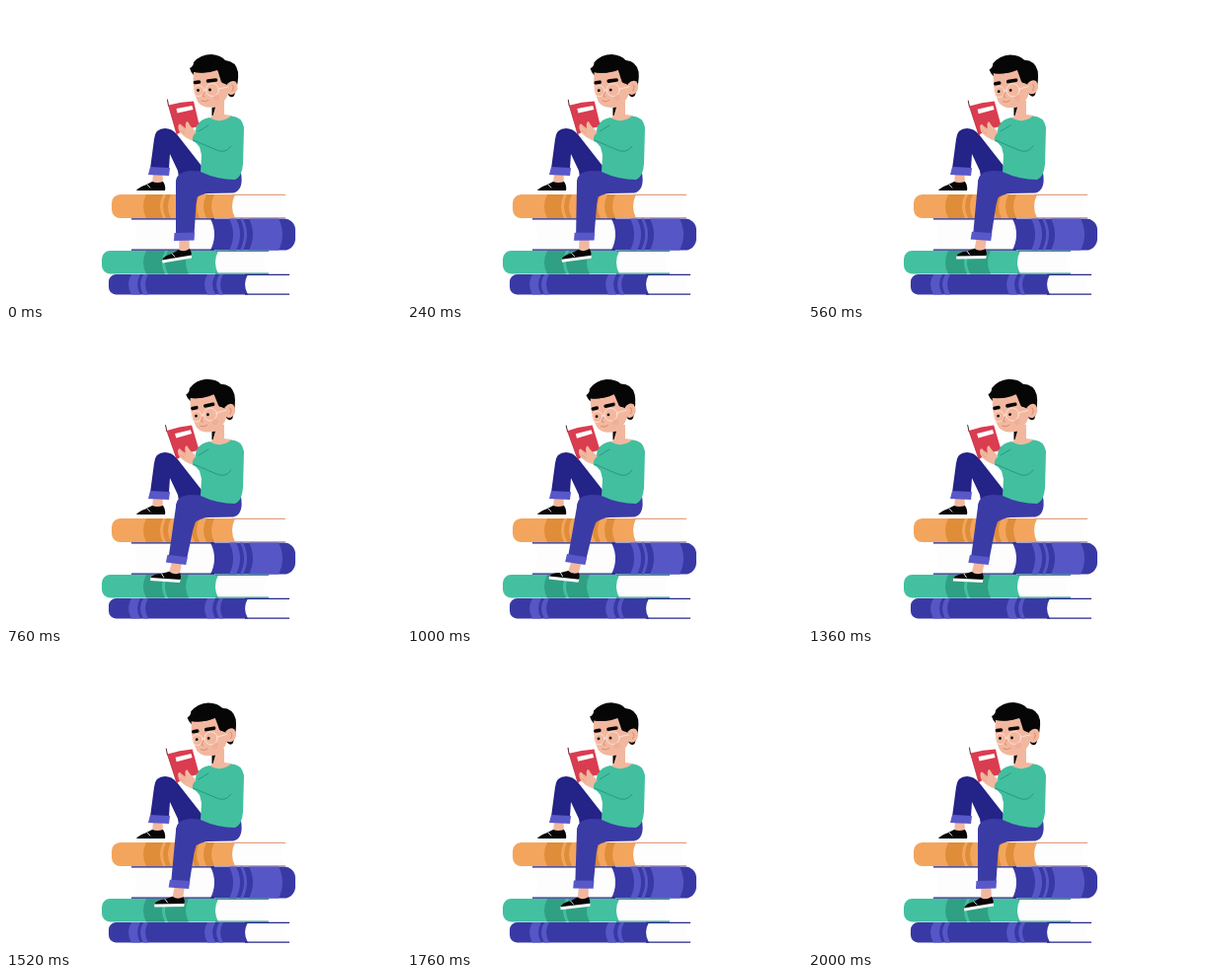
These frames come from a looping animation (400x300 px, 2040 ms). An HTML page:

```html
<!DOCTYPE html>
<html lang="en">
<head>
<meta charset="utf-8">
<title>Reading on a stack of books</title>
<style>
html, body { margin: 0; width: 100%; height: 100%; overflow: hidden; background: #fff; }
svg { display: block; width: 100vw; height: 100vh; }
.line { fill: none; stroke-linecap: round; stroke-linejoin: round; }
.skin { fill: #f2b89f; }
.navy { fill: #232388; }
.blue { fill: #3b3ba5; }
.cuff { fill: #5858c8; }
.green { fill: #42bf9f; }
.ink { fill: #060606; }
</style>
</head>
<body>
<svg viewBox="0 0 400 300">
  <g id="books"></g>

  <g id="backLeg">
    <path class="skin" d="M149 170H158.500L159 180H148Z"/>
    <path class="ink" d="M132 187Q134 184 141 181.500L148 178Q153 180 159 178Q162 182 161 187Z"/>
    <path class="line" stroke="#fff" stroke-width=".8" d="M143 181L146 184"/>
    <path class="navy" d="M146 165L150 135Q151 124 161 124Q168 124 173 130L198 162L200 180H176L174 167L166 150L165 165Z"/>
    <path class="cuff" d="M146 163L166 164L165 172L144 171Z"/>
  </g>

  <g id="shin">
    <g id="foot">
      <path class="skin" d="M175.500 236H185.500L186 250H175Z"/>
      <path fill="#fff" d="M158 257L188 251.500V255.500L158.500 260.500Z"/>
      <path class="ink" d="M158 257.500Q160 253 168 251L175 247Q180 250 186 246Q188 249 188 252.500Z"/>
      <path class="line" stroke="#fff" stroke-width=".8" d="M168 251L171 254"/>
    </g>
    <path class="blue" d="M172 178Q173 168 184 168Q197 170 195 186L192.500 201L190.500 232H172Z"/>
    <path class="cuff" d="M170.500 230L191 229.500L190.500 237.500L170 238Z"/>
  </g>
  <path class="blue" d="M172 179Q173 168 186 167L238 169Q241 187 230 189.500L205 190Q197 190.500 190 196Q174 194 172 179Z"/>

  <path class="skin" d="M209 96H221L221 110L229 111Q222 120 207 114L209 110Z"/>
  <path class="ink" d="M208.500 103L212 102.500L209.500 111H208.500Z"/>
  <path class="green" d="M206 113Q217 120 228 111.500Q239 112 241 123L240 160Q239 173 232 176Q214 176 197 168L198 151L196 143L190 136L193 121Q198 114 206 113Z"/>

  <g id="reading">
    <path fill="#fff" d="M163 95L166 99L173 129L169 124Z"/>
    <path class="line" stroke="#5c2632" d="M163.500 95L164.500 101"/>
    <path fill="#da3c50" d="M164.500 100.500Q177 97 190 96.500L196 122Q183 124 173 130Z"/>
    <path class="line" stroke="#b92c40" stroke-width=".8" d="M164.500 100.500L173 130"/>
    <path fill="#fff" d="M172.500 104L188.500 101L189.500 105L173.500 108.500Z"/>
    <path class="skin" d="M174.500 121Q176 118 178 121L182 124Q181 117 184 117Q186 121 188 123L192 127L194 132L190 137Q182 134 178 130Q174 127 174.500 121Z"/>
    <path class="line" stroke="#dc987f" stroke-width=".7" d="M178 122L182 126M177 126L181 129"/>
  </g>
  <path class="green" d="M193 121L203 115L216 126L229 142Q226 151 218 149L189 137Q188 131 193 128Z"/>
  <path class="line" stroke="#239079" stroke-width=".8" d="M190 136L211 145Q222 151 228 142M195 127L205 121"/>

  <g id="head">
    <path class="ink" d="M186 63Q190 61 190 57Q197 49 208 49Q218 50 222 55Q233 56 235 67Q236 77 231 91Q228 94 225 90L215 75L190 70Q187 67 186 63Z"/>
    <path class="skin" d="M190 67Q204 69 214 65Q218 68 219 78L224 79Q229 74 233 77Q237 84 231 89Q228 91 225 89Q222 98 213 102Q200 105 194 97Q188 84 190 67Z"/>
    <path class="ink" d="M188 66Q200 70 214 64L218 77L224 80V64L207 58Z"/>
    <path class="line" stroke="#080808" stroke-width="3.600" d="M191.500 77.500L195.500 77M204.500 76L212.500 75"/>
    <g class="line" stroke="#ffe3d8" stroke-width=".9">
      <circle cx="195" cy="86" r="5.500"/>
      <circle cx="209" cy="85" r="6.500"/>
      <path d="M200.500 85H203M215.500 84L225 82"/>
    </g>
    <circle class="ink" cx="194.500" cy="85.500" r="1.400"/>
    <circle class="ink" cx="206.500" cy="85" r="1.400"/>
    <path class="line" stroke="#d9856d" stroke-width=".9" d="M201 87L199 91L201 92M198 96Q202 98 205 95.500M229 80Q232 81 229 86"/>
    <circle cx="213" cy="93" r="3" fill="#f2a48f" opacity=".5"/>
  </g>
</svg>
<script>
const $ = id => document.getElementById(id);

// Each band is [left, width, colour]; a negative bend curves it to the right.
function book(x, y, end, h, cover, edge, bend, bands, rim) {
  const dir = Math.sign(bend), bottom = y + h, mid = y + h / 2;
  const spine = dir > 0 ? x : end, tip = dir > 0 ? end : x;
  const r = h * .36, turn = spine + r * dir, sweep = dir > 0 ? 0 : 1;
  const fold = `${edge + bend} ${bottom}Q${edge - bend} ${mid} ${edge + bend} ${y}Z`;
  const band = ([left, w, fill]) =>
    `<path fill="${fill}" d="M${left + bend} ${y}Q${left - bend} ${mid} ${left + bend} ${bottom}h${w}Q${left + w - bend} ${mid} ${left + w + bend} ${y}Z"/>`;
  return `<path fill="#fdfdfd" d="M${edge + bend} ${y}H${tip - 2 * dir}Q${tip - 8 * dir} ${mid} ${tip - 2 * dir} ${bottom}L${fold}"/>
    <path fill="${cover}" d="M${edge + bend} ${y}H${turn}A${r} ${r} 0 0 ${sweep} ${spine} ${y + r}V${bottom - r}A${r} ${r} 0 0 ${sweep} ${turn} ${bottom}L${fold}"/>
    ${bands.map(band).join("")}
    <path fill="none" stroke="${rim}" stroke-width="1.300" d="M${edge} ${y + .4}H${tip}M${edge} ${bottom - .4}H${tip}"/>`;
}

const amber = "#df8d38", teal = "#2fa083", violet = "#5656c6";
$("books").innerHTML =
  book(97, 248, 266, 23.5, "#43c0a0", 212, 3,
    [[139, 19, teal], [161, 21, teal]], "#2d9d82") +
  book(107, 191, 283, 24, "#f3a55d", 229, 3,
    [[139, 17, amber], [159, 5, amber], [188, 5, amber], [200, 8, amber]], "#dfa283") +
  book(127, 215.5, 293, 32, "#3939a5", 211, -4,
    [[230, 7, violet], [241, 3, violet], [250, 30, violet]], "#1c1c80") +
  book(104, 272, 287, 20.5, "#3939a5", 242, 3,
    [[124, 9, violet], [136, 5, violet], [201, 8, violet], [213, 4, violet]], "#26268c");

const turn = (id, angle, x, y) => $(id).setAttribute("transform", `rotate(${angle} ${x} ${y})`);

function draw(now) {
  const step = Math.max(0, Math.floor(now % 2040 / 40) - 1);
  const sway = (1 - Math.cos(step / 50 * 2 * Math.PI)) / 2;
  turn("head", -5.5 * sway, 215, 112);
  turn("reading", -4 * sway, 190, 130);
  turn("shin", 10 * sway, 183, 180);
  turn("foot", 6 * sway, 180, 243);
}

const start = performance.now();
function tick() {
  draw(performance.now() - start);
  requestAnimationFrame(tick);
}
tick();
</script>
</body>
</html>
```
